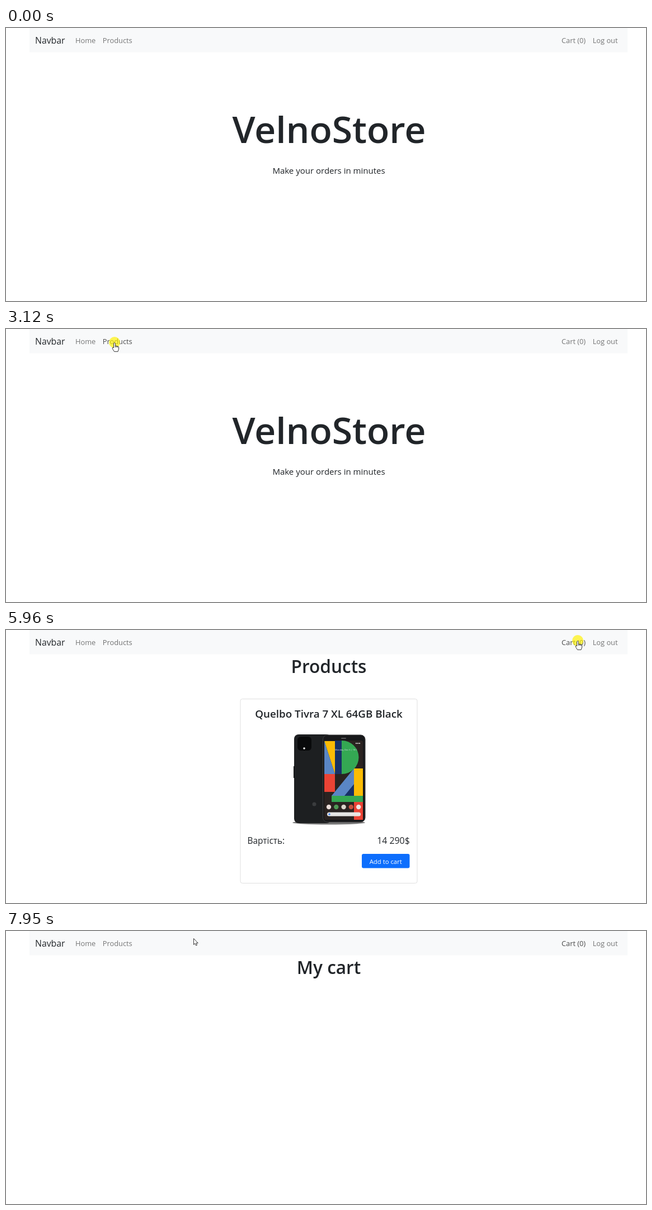
Animation, 1144 px wide and 489 px high, one loop 8000 ms. Source, as an HTML page:

```html
<!DOCTYPE html>
<html lang="en">
<head>
<meta charset="utf-8">
<title>Shop walkthrough</title>
<style>
  html, body { margin: 0; width: 100%; height: 100%; overflow: hidden; background: #fff; }
  svg { display: block; width: 100%; height: 100%; }
  text { font-family: "Open Sans", "Noto Sans", sans-serif; fill: #212529; white-space: pre; }
  .link { font-size: 12.8px; fill: #000; fill-opacity: .53; }
  .head { font-size: 31.6px; font-weight: 600; }
  .mid { text-anchor: middle; }
  .end { text-anchor: end; }
  .cursor { fill: #fff; stroke: #222; stroke-width: .9; stroke-linejoin: round; }
</style>
</head>
<body>
<svg viewBox="0 0 1144 489">
  <rect width="1144" height="489" fill="#fff"/>
  <rect x="42" width="1069" height="43.5" fill="#f8f9fa"/>
  <text x="52" y="27.5" font-size="15.8">Navbar</text>
  <text class="link" x="124" y="26.5">Home</text>
  <text class="link" x="172.8" y="26.5" id="products">Products</text>
  <text class="link" x="993" y="26.5" id="cart">Cart (0)</text>
  <text class="link" x="1048.7" y="26.5">Log out</text>

  <g class="page">
    <text class="mid" x="577.5" y="205.5" font-size="66" font-weight="600">VelnoStore</text>
    <text class="mid" x="577" y="261" font-size="15">Make your orders in minutes</text>
  </g>

  <g class="page">
    <text class="head mid" x="577" y="77">Products</text>
    <rect x="419" y="123.5" width="316" height="330" rx="3.5" fill="#fff" stroke="#dfdfdf"/>
    <text class="mid" x="577" y="156.5" font-size="18.8" font-weight="600">Quelbo Tivra 7 XL 64GB Black</text>
    <g id="phone">
      <ellipse cx="577" cy="345" rx="65" ry="3.5" fill="#777"/>
      <rect x="514" y="244" width="3" height="21" fill="#111"/>
      <rect x="515" y="187" width="66" height="159" rx="8" fill="#1d1f21"/>
      <rect x="521" y="191" width="25" height="25" rx="6" fill="#090a0b"/>
      <circle cx="533" cy="212" r="1.8" fill="#eee"/>
      <circle cx="551" cy="312" r="3.5" fill="#3a3c3e"/>
      <rect x="566.5" y="188" width="75.5" height="156" rx="8" fill="#17181a" stroke="#3c3d3f"/>
      <rect x="599" y="193" width="9" height="2" rx="1" fill="#555"/>
      <rect x="569" y="198" width="69" height="142" rx="3" fill="#2a2321"/>
      <path d="M569 199H588V258ZM622 248H638V297H622Z" fill="#fbbc05"/>
      <path d="M569 199V258H588ZM582 297L622 248V297Z" fill="#5a86c5"/>
      <path d="M588 198H600V258H588ZM605 297L622 276V297Z" fill="#173166"/>
      <path d="M600 198A30.5 30 0 0 1 600 258ZM582 297H638V308H582Z" fill="#34a853"/>
      <path d="M569 258H588V290H569ZM622 308H638V340H622Z" fill="#ea4335"/>
      <path d="M625 203H634" stroke="#fff" stroke-width="1.6" stroke-dasharray="2 1"/>
      <text x="588" y="216" style="font-size:4px;fill:#dde">Monday, Dec 6 | 18 C</text>
      <rect x="574" y="326.5" width="60" height="7" rx="3.5" fill="#e8e6e4"/>
      <circle cx="578" cy="330" r="1.8" fill="#4285f4"/>
    </g>
    <text x="431.5" y="382.5" font-size="15.4">Вартість:</text>
    <text class="end" x="721.8" y="382.5" font-size="15.9">14 290$</text>
    <rect x="636" y="401" width="85.5" height="25.5" rx="3" fill="#0d6efd"/>
    <text class="mid" x="678.7" y="418.5" style="font-size:11.3px;fill:#fff">Add to cart</text>
  </g>

  <g class="page">
    <text class="head mid" x="577" y="77">My cart</text>
  </g>

  <circle id="click" r="10" fill="#fff100" fill-opacity=".68"/>
  <g id="pointer">
    <path class="cursor" d="M.5 .5V11.4L3 9.2L4.7 13L6.5 12.2L5 8.6H8.2Z"/>
    <path class="cursor" d="M-1.5 1.7Q0-.6 1.3 1.7V6L5 6.8Q7.6 7.2 7.5 9V12L6 16.4H-.5L-3.4 11.8Q-4.5 9.6-3.3 9Q-2.4 8.7-1.5 10ZM1.3 6V9M3.4 6.6V9M5.5 7V9.2"/>
    <path d="M-2.5-7.5H-1L0-7L1-7.5H2.5M0-7V7M-2.5 7.5H-1L0 7L1 7.5H2.5" fill="none" stroke="#222"/>
  </g>
</svg>
<script>
const LOOP = 8000, TICK = 70;
const $ = id => document.getElementById(id);
const pages = [...document.querySelectorAll('.page')];
const pointer = $('pointer'), click = $('click');
const clamp = v => Math.max(0, Math.min(1, v));
const show = (el, on) => el.style.display = on ? '' : 'none';

['#e9dcd8', '#4f9a55', '#d9d4c9', '#c5523f', '#f0e9e6'].forEach((fill, i) => {
  const dot = document.createElementNS('http://www.w3.org/2000/svg', 'circle');
  const attrs = { cx: 577 + i * 13.3, cy: 317, r: 4.2, fill };
  for (const k in attrs) dot.setAttribute(k, attrs[k]);
  $('phone').append(dot);
});

// The pointer glides on quadratic curves; each move starts where the last one stopped.
const moves = [];
let last = { x: 1185, y: 576 };
function glide(start, end, via, to) {
  moves.push({ start, end, from: last, via, to });
  last = to;
}
const spot = {
  rest: { x: 748, y: 106 },
  products: { x: 194, y: 24 },
  title: { x: 565.5, y: 73 },
  nearCart: { x: 1024, y: 13 },
  cart: { x: 1022, y: 19 }
};
glide(310, 720, { x: 890, y: 215 }, spot.rest);
glide(1250, 2020, { x: 430, y: 60 }, { x: 212, y: 27 });
glide(2100, 2380, { x: 248, y: 39 }, { x: 284, y: 35 });
glide(2440, 2780, { x: 240, y: 30 }, spot.products);
glide(3650, 4150, { x: 375, y: 76 }, spot.title);
glide(4350, 5120, { x: 959, y: 39 }, spot.nearCart);
glide(5190, 5890, { x: 1008, y: 18 }, spot.cart);
glide(6550, 7330, { x: 920, y: 24 }, { x: 638, y: 21 });
glide(7390, 7950, { x: 480, y: 20 }, { x: 335, y: 13 });

const bezier = (a, b, c, p) => (1 - p) ** 2 * a + 2 * p * (1 - p) * b + p * p * c;

function pointerAt(t) {
  const move = moves.findLast(m => t >= m.start);
  if (!move) return null;
  const { start, end, from, via, to } = move;
  const steps = Math.round((end - start) / TICK) + 1;
  const step = Math.floor((t - start + 15) / TICK) + 1;
  const p = Math.min(1, step / steps);
  return ['x', 'y'].map(k => Math.round(bezier(from[k], via[k], to[k], p)));
}

const fade = (t, on, off = Infinity) => clamp((t - on) / 150) - clamp((t - off) / 150);
const setLink = (id, level) => $(id).style.fillOpacity = .53 + .17 * level;

function draw(t) {
  const page = t < 3190 ? 0 : t < 6030 ? 1 : 2;
  pages.forEach((el, i) => show(el, i === page));
  setLink('products', fade(t, 1900, 2235) + fade(t, 2600, 5830));
  setLink('cart', fade(t, 4900));

  const pos = pointerAt(t);
  const pressed = (t >= 3120 && t < 3260) || (t >= 5890 && t < 6030);
  show(pointer, pos);
  show(click, pressed);
  if (!pos) return;

  const [x, y] = pos;
  const onLink = y < 40 && ((x > 166 && x < 232) || (x > 986 && x < 1044));
  const onHead = page > 0 && x > 512 && x < 642 && y > 48 && y < 87;
  const kind = onLink ? 1 : onHead ? 2 : 0;
  [...pointer.children].forEach((el, i) => show(el, i === kind));
  for (const el of [pointer, click]) el.setAttribute('transform', `translate(${x} ${y})`);
}

const begin = performance.now();
function tick() {
  draw((performance.now() - begin) % LOOP);
  requestAnimationFrame(tick);
}
tick();
</script>
</body>
</html>
```
